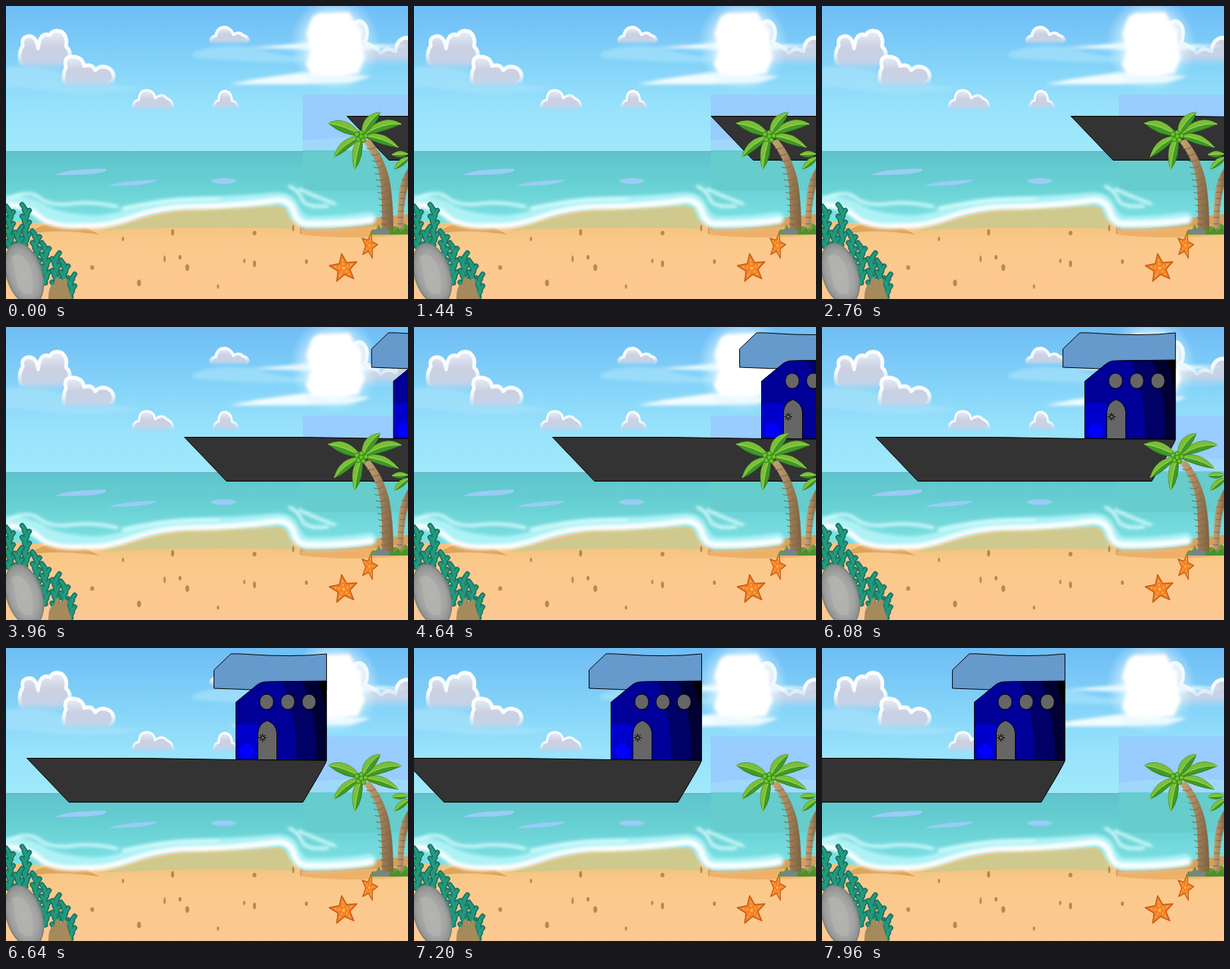
Write an HTML page that moves like this. It is 550 px wide and 400 px high and loops after 8 s.

```html
<!DOCTYPE html>
<html lang="en">
<head>
<meta charset="utf-8">
<title>Ship passing a beach</title>
<style>
html, body { margin: 0; width: 100%; height: 100%; overflow: hidden; }
svg { display: block; width: 550px; height: 400px; }
</style>
</head>
<body>
<svg viewBox="0 0 550 400">
  <defs>
    <linearGradient id="sky" x2="0" y2="1">
      <stop stop-color="#6fbdf6"/><stop offset=".4" stop-color="#84d3f8"/>
      <stop offset=".7" stop-color="#98e2fc"/><stop offset="1" stop-color="#9eeafa"/>
    </linearGradient>
    <linearGradient id="sea" x2="0" y2="1">
      <stop stop-color="#5fc3cc"/><stop offset=".35" stop-color="#66cfd2"/><stop offset="1" stop-color="#84e6e8"/>
    </linearGradient>
    <linearGradient id="sand" x2="0" y2="1">
      <stop stop-color="#efbb72"/><stop offset=".4" stop-color="#fac98a"/><stop offset="1" stop-color="#fdc892"/>
    </linearGradient>
    <linearGradient id="puff" x2="0" y2="1">
      <stop stop-color="#e6effa"/><stop offset=".4" stop-color="#ccd0e2"/>
      <stop offset=".75" stop-color="#c4d3e8"/><stop offset="1" stop-color="#a8d8f4" stop-opacity="0"/>
    </linearGradient>
    <linearGradient id="rim" x2="0" y2="1">
      <stop stop-color="#fff"/><stop offset=".5" stop-color="#f4fbff"/><stop offset=".85" stop-color="#fff" stop-opacity="0"/>
    </linearGradient>
    <linearGradient id="bark">
      <stop stop-color="#c8a878"/><stop offset=".5" stop-color="#a98860"/><stop offset="1" stop-color="#7d6242"/>
    </linearGradient>
    <radialGradient id="glow">
      <stop offset=".35" stop-color="#fff"/><stop offset=".6" stop-color="#f0fbff" stop-opacity=".7"/>
      <stop offset="1" stop-color="#c8f0ff" stop-opacity="0"/>
    </radialGradient>
    <radialGradient id="stone">
      <stop stop-color="#b0b0ae"/><stop offset=".7" stop-color="#a4a4a4"/><stop offset="1" stop-color="#8c908e"/>
    </radialGradient>
    <filter id="soft" x="-20%" y="-50%" width="140%" height="200%"><feGaussianBlur stdDeviation="2"/></filter>
    <clipPath id="cabin"><path d="M286 152V74L313 52Q319 46 329 46L410 45V153Z"/></clipPath>
  </defs>

  <!-- sky -->
  <rect width="550" height="200" fill="url(#sky)"/>
  <g filter="url(#soft)" fill="#a6e2fb" opacity=".7">
    <path d="M0 84Q40 78 80 92T190 112Q120 124 60 116T0 112Z"/>
    <path d="M255 64Q300 46 350 60T412 66L410 76Q330 78 255 70Z"/>
  </g>
  <g fill="url(#puff)" stroke="url(#rim)" stroke-width="5" stroke-linejoin="round">
    <path d="M20 82Q16 64 23 54Q20 42 32 41Q42 42 44 58Q46 34 60 40Q64 31 76 35Q85 42 82 55Q90 62 86 74Q80 88 62 90Z"/>
    <path d="M80 111Q77 92 82 84Q78 68 92 69Q105 70 107 82Q118 78 122 88Q130 79 141 85Q150 91 146 103L130 114Z"/>
    <path d="M174 142Q172 130 182 128Q182 114 194 115Q203 116 204 126Q214 118 220 126Q230 130 229 144Z" stroke-width="3"/>
    <path d="M279 52Q279 42 287 41Q289 28 301 29Q309 32 311 39Q319 34 324 40Q333 42 332 53Z" stroke-width="4"/>
    <path d="M284 142Q284 130 291 129Q291 115 301 116Q309 119 309 129Q318 132 318 143Z" stroke-width="3"/>
    <path d="M472 74V27Q485 13 493 29Q496 40 491 50Q505 55 513 64Q523 55 533 62Q534 45 548 43L560 48V78L512 84Z"/>
  </g>
  <rect x="406" y="121" width="144" height="77" fill="#99ccff"/>
  <path d="M406 184Q470 176 550 180V198H406Z" fill="#a0d8fc"/>
  <g filter="url(#soft)" fill="#f2fcff">
    <path d="M332 57L415 50L550 54L480 61Z"/>
    <path d="M305 107L345 99L410 90L500 96L470 105L400 107Z"/>
  </g>
  <ellipse cx="450" cy="52" rx="62" ry="67" fill="url(#glow)"/>
  <path d="M418 17Q426 7 438 10L470 8L477 24L486 34V56L491 70L482 92L455 96L418 94L410 80L418 58L411 38Z" fill="#fff" filter="url(#soft)"/>

  <!-- sea -->
  <rect y="198" width="550" height="115" fill="url(#sea)"/>
  <rect x="406" y="197" width="144" height="55" fill="#66cccc"/>
  <path d="M0 199H406" stroke="#6ab5cf" stroke-width="2"/>
  <g fill="#99ccf6">
    <path d="M68 231Q75 223 137 222Q140 228 108 230Z"/>
    <path d="M141 246Q152 239 206 237Q202 243 170 245Z"/>
    <ellipse cx="298" cy="239" rx="17" ry="4"/>
  </g>

  <!-- shore -->
  <path d="M0 292Q50 300 88 292Q115 308 160 296Q240 272 330 270Q384 268 391 290L404 301L550 288V400H0Z" fill="url(#sand)"/>
  <path d="M128 307Q220 280 300 272Q378 266 387 279L393 304Q250 300 128 307Z" fill="#d0c98e"/>
  <path d="M402 300Q450 296 550 284V309Q470 318 402 311Z" fill="#d99f5e"/>
  <path d="M404 306Q470 306 550 296V312Q470 320 404 312Z" fill="#eeb069"/>
  <path d="M40 304Q66 292 92 294Q112 304 128 312Q70 304 40 310Z" fill="#dca55c"/>
  <g fill="none" stroke-linecap="round" filter="url(#soft)">
    <path d="M0 267Q30 266 48 278T112 294Q140 296 172 283T260 269T370 263Q388 262 393 277T412 296Q460 296 498 290" stroke="#aef2f6" stroke-width="17"/>
    <path d="M0 272Q28 272 46 288T112 300Q135 302 175 288T260 274T370 265Q389 264 394 281T413 297Q460 298 500 292" stroke="#fff" stroke-width="7"/>
    <path d="M4 262Q30 250 46 262T90 270T152 274M388 246Q400 252 405 264T440 273M402 250Q418 258 450 270M160 276Q220 262 290 263" stroke="#d8fcfc" stroke-width="4"/>
  </g>
  <g id="specks" fill="#b38b4e"></g>

  <!-- reef corner -->
  <g id="weeds" fill="none" stroke-linecap="round" stroke-linejoin="round"></g>
  <path d="M58 400Q58 380 66 380Q68 362 76 376Q84 364 84 382L90 400Z" fill="#a58a5c"/>
  <ellipse cx="25" cy="366" rx="24" ry="43" transform="rotate(-17 25 366)" fill="url(#stone)" stroke="#7b8580" stroke-width="2"/>
  <path d="M8 342Q20 334 30 350T36 392Q20 398 14 374Z" fill="#b5b5b1" opacity=".7"/>

  <g id="starfish" fill="#f58426" stroke="#c25a18" stroke-width="1.5" stroke-linejoin="round"></g>

  <!-- ship, with its bow at x = 0 -->
  <g id="ship" stroke="#000" stroke-width="1">
    <path d="M256 30L279 8Q284 7.500 300 8.500Q364 13 410 8V57H308L256 55Z" fill="#69c"/>
    <g clip-path="url(#cabin)" stroke="none">
      <rect x="280" y="40" width="135" height="120"/>
      <g id="shades"></g>
    </g>
    <path d="M286 152V74L313 52Q319 46 329 46L410 45V153Z" fill="none"/>
    <path d="M316 152.500V116Q317 103 329 99Q341 104 342 116V153Z" fill="#666"/>
    <g id="windows" fill="#666"></g>
    <path id="knob" fill="none"/>
    <circle cx="322.500" cy="122.500" r="2.500" fill="#666"/>
    <path d="M0 150.500H161L286 152.500L410 153.500Q408 160 377.500 210.500H57.500Z" fill="#333"/>
  </g>

  <!-- palms -->
  <g>
    <path d="M498 312Q500 302 506 306L510 298L514 305L533 300L540 304L546 296L550 300V312Z" fill="#5e9e32"/>
    <path d="M552 219Q538 238 537 264L534 304H544Q542 270 552 240Z" fill="url(#bark)"/>
    <path d="M488 184Q511 212 513 246Q515 280 514 306H530Q530 262 524 234Q516 203 498 182Z" fill="url(#bark)"/>
    <path id="rings" stroke="#80643f" fill="none"/>
    <path d="M500 311Q504 303 514 304Q525 304 526 312Z" fill="#74848c"/>
    <path d="M524 312L527 302L531 309L536 301L540 309L548 302L550 311Z" fill="#4a902c"/>
    <g id="fronds" stroke-linejoin="round"></g>
    <g id="nuts" fill="#68c62e" stroke="#347d18"></g>
  </g>
</svg>
<script>
const byId = id => document.getElementById(id);
const fill = (id, items, draw) => { byId(id).innerHTML = items.map(draw).join(''); };
const polar = (x, y, r, a) => `${(x + r * Math.cos(a)).toFixed(1)} ${(y + r * Math.sin(a)).toFixed(1)}`;

fill('specks', [[160, 318], [228, 309], [118, 357], [217, 345], [238, 343], [248, 357], [290, 383],
  [340, 352], [340, 310], [393, 303], [411, 349], [182, 378], [326, 348]],
  ([x, y], i) => `<ellipse cx="${x}" cy="${y}" rx="${1.5 + i % 3 * .6}" ry="${3 + i % 2 * 1.5}"/>`);

// Each weed is a wavy stalk: foot x, foot y, height.
fill('weeds', [[5, 328, 50], [27, 326, 50], [17, 332, 28], [41, 362, 54], [54, 378, 54],
  [68, 384, 48], [80, 386, 40], [89, 397, 30]], ([x, y, h]) => {
  let d = `M${x} ${y}`, leaves = '';
  for (let k = 0; k < h; k += 8) {
    const side = k / 8 % 2 ? 1 : -1;
    d += `L${x + side * 2} ${y - k}`;
    leaves += `M${x} ${y - k}l${side * 5} -7`;
  }
  return `<path d="${d}${leaves}" stroke="#176b60" stroke-width="7"/>
    <path d="${d}${leaves}" stroke="#22997c" stroke-width="4"/>`;
});

fill('starfish', [[462, 358, 20, 1, -8], [497, 327, 19, .62, 14]], ([x, y, r, squash, turn]) => {
  const points = Array.from({ length: 10 }, (_, i) => polar(0, 0, i % 2 ? r * .43 : r, i * Math.PI / 5 - 1.57));
  const dots = Array.from({ length: 5 }, (_, i) => `M0 0L${polar(0, 0, r * .7, i * Math.PI * .4 - 1.57)}`);
  return `<g transform="translate(${x} ${y}) scale(${squash} 1) rotate(${turn})">
    <path d="M${points.join('L')}Z"/><path d="${dots.join('')}" stroke="#ffc05a" stroke-dasharray="2 3"/></g>`;
});

fill('shades', [[113, 190, '#003'], [95, 160, '#006'], [67, 135, '#009'], [38, 38, '#00c'], [10, 10, '#00f']],
  ([rx, ry, color]) => `<ellipse cx="301" cy="141" rx="${rx}" ry="${ry}" fill="${color}"/>`);
fill('windows', [328, 357, 386], x => `<ellipse cx="${x}" cy="73.5" rx="9.5" ry="10.5"/>`);
byId('knob').setAttribute('d', Array.from({ length: 8 }, (_, i) =>
  `M${polar(322.5, 122.5, 2.5, i * Math.PI / 4)}L${polar(322.5, 122.5, 5.5, i * Math.PI / 4)}`).join(''));

byId('rings').setAttribute('d', Array.from({ length: 13 }, (_, i) => {
  const k = i / 13;
  return `M${493 + 21 * Math.sqrt(k)} ${194 + k * 112}q7 3 13 -2` + (i > 4 ? `M${546 - k * 12} ${194 + k * 112}h8` : '');
}).join(''));

// Frond: root, tip, upper and lower bend points.
fill('fronds', [
  [550, 202, 528, 203, 538, 194, 540, 210], [552, 206, 531, 223, 536, 206, 548, 218],
  [487, 177, 537, 193, 516, 167, 512, 190], [487, 177, 449, 206, 456, 178, 465, 200],
  [487, 177, 477, 223, 468, 190, 490, 207], [487, 177, 541, 161, 515, 145, 516, 172],
  [487, 177, 512, 145, 485, 148, 507, 163], [487, 177, 441, 160, 465, 148, 462, 178]
], ([x, y, tipX, tipY, ax, ay, bx, by]) => {
  const root = `M${x} ${y}`, tip = `${tipX} ${tipY}`, mid = `${(ax + bx) / 2} ${(ay + by) / 2}`;
  return `<path d="${root}Q${ax} ${ay} ${tip}Q${bx} ${by} ${x} ${y}Z" fill="#3f9a26" stroke="#347f20"/>
    <path d="${root}Q${ax} ${ay} ${tip}Q${mid} ${x} ${y}Z" fill="#79bf38"/>
    <path d="${root}Q${mid} ${tip}" fill="none" stroke="#b3d957"/>`;
});
fill('nuts', [[480, 175], [486, 173], [492, 177], [482, 182], [489, 183], [486, 178]],
  ([x, y]) => `<circle cx="${x}" cy="${y}" r="3.2"/>`);

// Bow position over time: gathers speed, then sails on evenly.
const course = [[0, 466.5], [840, 433], [1680, 396], [2520, 352], [2760, 340.7], [8000, -80.8]];
function bowAt(t) {
  const i = course.findIndex(([end]) => t < end);
  const [t0, x0] = course[i - 1], [t1, x1] = course[i];
  return x0 + (x1 - x0) * (t - t0) / (t1 - t0);
}

const ship = byId('ship');
function frame() {
  const t = Math.floor(performance.now() % 8000 / 40) * 40;
  ship.setAttribute('transform', `translate(${bowAt(t).toFixed(2)} 0)`);
  requestAnimationFrame(frame);
}
frame();
</script>
</body>
</html>
```
